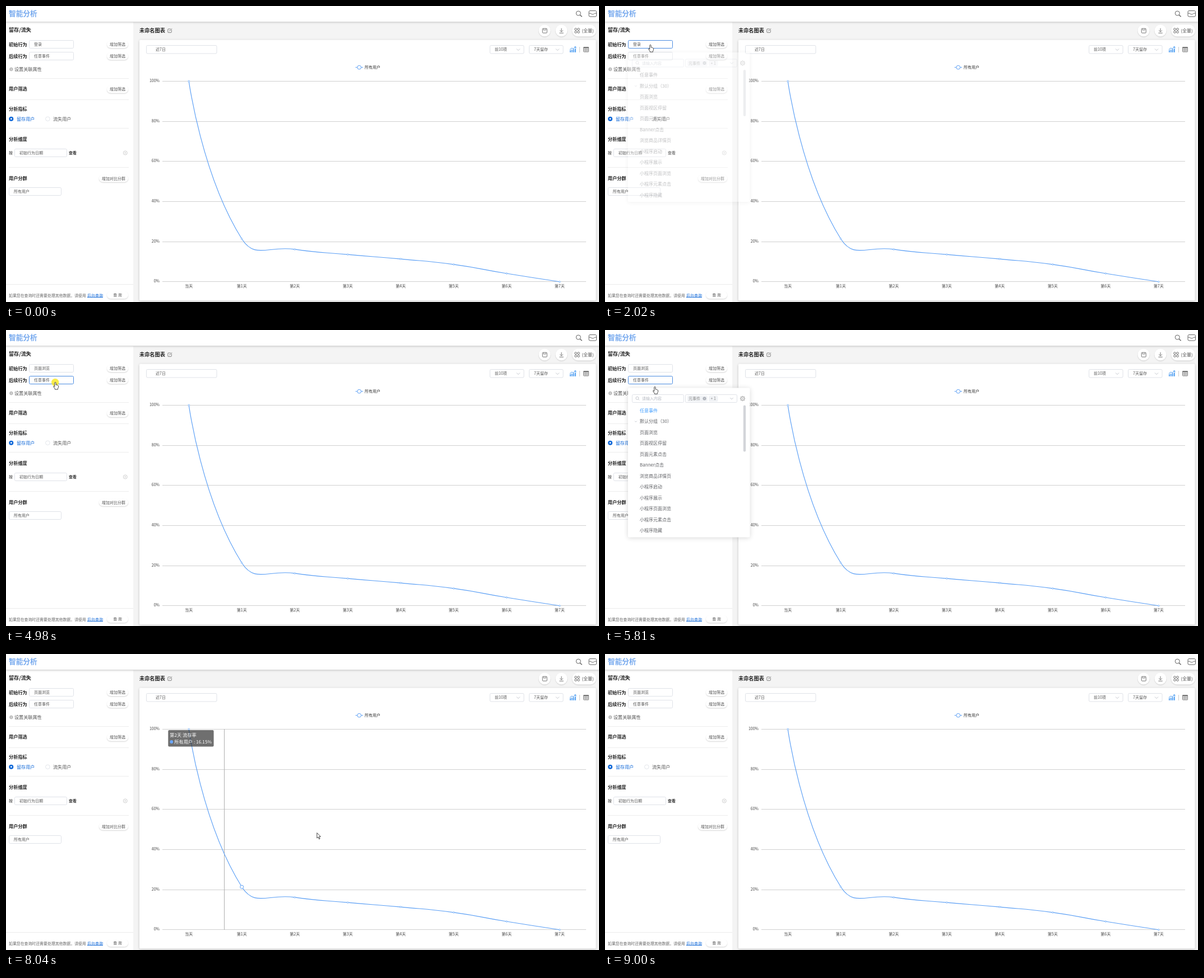
Recreate the animation shown at these times as an HTML page with a canvas. Size 1058 by 529 pixels, loop 9120 ms.

```html
<!DOCTYPE html>
<html lang="zh">
<head>
<meta charset="utf-8">
<title>智能分析</title>
<style>
html, body { margin: 0; width: 100%; height: 100%; overflow: hidden; background: #fff; }
canvas { display: block; width: 100vw; height: 100vh; }
</style>
</head>
<body>
<canvas id="stage" width="1058" height="529"></canvas>
<script>
const W = 1058, H = 529, LOOP = 9120;
const SANS = '"Noto Sans CJK SC", "Noto Sans CJK", "Noto Sans", sans-serif';
const BLUE = '#5b9ff5', ACCENT = '#1068d8', EDGE = '#dfe2e8', INK = '#555', ICON = '#666';
const main = document.getElementById('stage').getContext('2d');
const sheet = document.createElement('canvas');
sheet.width = W;
sheet.height = H;
const layer = sheet.getContext('2d');
let g = main;

const clamp = (v, a, b) => Math.min(b, Math.max(a, v));
const part = (t, a, b) => clamp((t - a) / (b - a), 0, 1);
const mix = (a, b, u) => a + (b - a) * u;
const easeOut = (u, p) => 1 - Math.pow(1 - u, p);
const smooth = u => u * u * (3 - 2 * u);

// ---- drawing helpers ----
function text(s, x, y, size = 7, color = INK, weight = 400, align = 'left') {
  g.font = `${weight} ${size}px ${SANS}`;
  g.fillStyle = color;
  g.textAlign = align;
  g.fillText(s, x, y + size * 0.37);
}
const bold = (s, x, y, size = 8.2) => text(s, x, y, size, '#222', 700);

function paint(fill, stroke, width = 1) {
  if (fill) { g.fillStyle = fill; g.fill(); }
  if (stroke) { g.strokeStyle = stroke; g.lineWidth = width; g.stroke(); }
}
function box(x, y, w, h, r, fill, stroke, width) {
  g.beginPath();
  g.roundRect(x, y, w, h, r);
  paint(fill, stroke, width);
}
function dot(x, y, r, fill, stroke, width) {
  g.beginPath();
  g.arc(x, y, r, 0, 7);
  paint(fill, stroke, width);
}
function line(color, width, ...p) {
  g.beginPath();
  for (let i = 0; i < p.length; i += 2) g.lineTo(p[i], p[i + 1]);
  paint(null, color, width);
}
function rect(x, y, w, h, color) {
  g.fillStyle = color;
  g.fillRect(x, y, w, h);
}
function raised(color, blur, dy, draw) {
  g.save();
  g.shadowColor = color;
  g.shadowBlur = blur;
  g.shadowOffsetY = dy;
  draw();
  g.restore();
}
function pill(x, y, w, h, label) {
  raised('rgba(0,0,0,.15)', 2, 1.2, () => box(x, y, w, h, h / 2, '#fff'));
  if (label) text(label, x + w / 2, y + h / 2, 7, INK, 400, 'center');
}
function field(x, y, w, h, label, indent = 9, focus = false) {
  box(x + .5, y + .5, w - 1, h - 1, 2, '#fff', focus ? '#4a8be0' : EDGE);
  text(label, x + indent, y + h / 2);
}
const chevron = (x, y, s = 3) => line('#b4b8c0', .8, x - s, y - s / 2, x, y + s / 2, x + s, y - s / 2);
function gear(x, y, r) {
  for (let i = 0; i < 8; i++) {
    const a = i * Math.PI / 4, c = Math.cos(a), s = Math.sin(a);
    line('#999', 1.2, x + c * r * .8, y + s * r * .8, x + c * r * 1.15, y + s * r * 1.15);
  }
  dot(x, y, r * .85, null, '#999', .8);
  dot(x, y, r * .35, null, '#999', .7);
}

// ---- pointer path ----
const stops = [
  // start, end, x, y, powers of the easing
  [470, 1310, 81, 69, 2.25, 1.73],
  [2430, 2880, 113.5, 162],
  [4250, 4630, 88, 93],
  [5710, 6120, 94.5, 146],
  [7690, 8600, 1002, 510, 1.45, 1.33],
  [8600, 9000, 1028, 531, 1.3, 1.3]
];
function pointer(t) {
  let x = 1058, y = 529;
  for (const [a, b, tx, ty, px, py] of stops) {
    if (t < a) break;
    const u = part(t, a, b);
    x = mix(x, tx, px ? easeOut(u, px) : smooth(u));
    y = mix(y, ty, py ? easeOut(u, py) : smooth(u));
  }
  return { x, y };
}
function drawPointer(t) {
  if (t < 470 || t >= 9000) return;
  const { x, y } = pointer(t);
  for (const start of [1580, 3620, 4820, 6380]) {
    const age = t - start;
    if (age >= 0 && age < 190) {
      g.globalAlpha = .8 * (1 - part(age, 170, 190));
      dot(x - .3, y + .5, 6.7, '#f7e81e');
      g.globalAlpha = 1;
    }
  }
  g.save();
  g.translate(x, y);
  g.lineJoin = 'round';
  g.beginPath();
  if (x < 122) {
    g.moveTo(-1.2, 8.4);
    g.lineTo(-1.2, 1.4);
    g.quadraticCurveTo(-1.1, .4, 0, .4);
    g.quadraticCurveTo(1, .4, 1.1, 1.4);
    g.lineTo(1.1, 5);
    g.quadraticCurveTo(2.3, 4.4, 2.9, 5.5);
    g.quadraticCurveTo(4.1, 5, 4.5, 6.2);
    g.quadraticCurveTo(5.7, 6, 5.7, 7.4);
    g.quadraticCurveTo(5.8, 10, 4.5, 11.4);
    g.lineTo(4.4, 13.2);
    g.lineTo(-.6, 13.2);
    g.lineTo(-.8, 11.8);
    g.lineTo(-3.3, 8.3);
    g.quadraticCurveTo(-3.4, 6.9, -2.2, 7.3);
  } else {
    g.moveTo(.5, 0);
    for (const [px, py] of [[.5, 9.4], [2.7, 7.5], [4.2, 11.2], [5.8, 10.5], [4.3, 7], [7, 6.7]]) g.lineTo(px, py);
  }
  g.closePath();
  paint('#fff', '#333', .9);
  g.restore();
}

// ---- chart ----
const LEFT = 279, STEP = 94.5, TOP = 134.3, FLOOR = 492.8;
const rates = [100, 21.34, 16.15, 13.57, 11.36, 8.63, 4.12, 0];
const points = rates.map((v, i) => [LEFT + STEP * (i + .5), mix(FLOOR, TOP, v / 100)]);
const days = rates.map((_, i) => i ? `第${i}天` : '当天');
const bandAt = x => clamp(Math.floor((x - LEFT) / STEP), 0, 7);

function curve() {
  const dist = (a, b) => Math.hypot(a[0] - b[0], a[1] - b[1]);
  let out = points[0];
  g.beginPath();
  g.moveTo(...out);
  for (let i = 1; i < points.length; i++) {
    const p = points[i], q = points[i + 1], o = points[i - 1];
    let into = p, next = p;
    if (q) {
      const vx = (q[0] - o[0]) / 2, vy = (q[1] - o[1]) / 2;
      const r = dist(p, q) / (dist(p, q) + dist(o, p));
      into = [p[0] - vx * (1 - r), p[1] - vy * (1 - r)];
      next = [p[0] + vx * r, p[1] + vy * r];
    }
    g.bezierCurveTo(...out, ...into, ...p);
    out = next;
  }
  paint(null, BLUE, 1.15);
}

function tooltip(x, band) {
  const rate = rates[band].toFixed(2) + '%';
  box(x, 136, 86 - 4.7 * (7 - rate.length), 29.5, 2, 'rgba(50,50,50,.7)');
  text(days[band] + ' 流存率', x + 3, 145, 8.2, '#fff');
  dot(x + 6, 157, 2.9, '#6aa5f8');
  text('所有用户 : ' + rate, x + 11, 157, 8.2, '#fff');
}

function chart(t) {
  for (let i = 0; i <= 5; i++) {
    const y = Math.round(133.9 + 71.7 * i);
    rect(LEFT, y, 756, 1, '#d0d0d0');
    text(100 - 20 * i + '%', 274, y - .2, 7, '#444', 400, 'right');
  }
  days.forEach((d, i) => text(d, points[i][0], 500, 7, '#444', 400, 'center'));
  line(BLUE, 1, 623.5, 109.7, 637, 109.7);
  dot(630.2, 109.7, 3.4, '#fff', BLUE);
  text('所有用户', 640, 109.2, 7, '#333');

  const tip = t > 520 && t < 990 ? 1 : t > 7825 && t < 8640 ? 2 : 0;
  const { x, y } = pointer(t);
  if (tip && x > LEFT && x < 1035 && y < FLOOR) {
    const lx = Math.round(clamp(pointer(t - 135).x, points[0][0], points[7][0]));
    rect(lx, 134, 1, 359, '#b0b0b0');
  }
  curve();
  const big = tip ? bandAt(pointer(t - 90).x) : -1;
  points.forEach(([px, py], i) => {
    if (i === big) dot(px, py, 3, '#fff', BLUE);
    else dot(px, py, 1.3, '#fff', BLUE, .7);
  });
  if (tip === 1) tooltip(mix(950, 360, Math.pow(part(t, 520, 965), 1.5)), bandAt(x));
  if (tip === 2) tooltip(280 + 430 * Math.pow(part(t, 7830, 8640), 2.85), bandAt(x));
}

// ---- page ----
function header() {
  raised('rgba(0,0,0,.22)', 4, 1, () => rect(0, 0, W, 28, '#fff'));
  text('智能分析', 5, 13.5, 12.7, '#76a9ee', 700);
  dot(1021.2, 13, 4, null, ICON, 1);
  line(ICON, 1.5, 1024.2, 16, 1027.6, 19.3);
  box(1040, 8.5, 13.5, 10.5, 2, null, ICON);
  g.beginPath();
  g.moveTo(1040, 13);
  g.lineTo(1043, 13);
  g.quadraticCurveTo(1046.7, 17, 1050.5, 13);
  g.lineTo(1053.5, 13);
  paint(null, ICON);
}

function panel(t) {
  rect(0, 29, 227, 500, '#fff');
  bold('留存/流失', 5, 43, 9.1);
  bold('初始行为', 5, 69);
  bold('后续行为', 5, 89.5);
  field(41, 61, 80, 15, t < 4040 ? '登录' : '页面浏览', 9, t >= 1580 && t < 3680);
  field(41, 82, 80, 15, '任意事件', 9, t >= 4820 && t < 6410);
  pill(180, 62, 38, 13, '增加筛选');
  pill(180, 83, 38, 13, '增加筛选');
  gear(9.3, 113, 2.8);
  text('设置关联属性', 15, 113, 8.1);
  bold('用户筛选', 5, 148);
  pill(180, 142, 38, 13.5, '增加筛选');
  bold('分析指标', 5, 183.5);
  dot(9.3, 201.7, 4, ACCENT);
  dot(9.3, 201.7, 1.4, '#fff');
  text('留存用户', 19, 202, 8.1, ACCENT);
  dot(74.4, 201.7, 3.8, '#fff', EDGE, .9);
  text('流失用户', 84, 202, 8.1);
  bold('分析维度', 5, 237.5);
  text('按', 5, 262.5, 7, '#333');
  field(15, 255, 94, 15, '初始行为日期');
  text('查看', 112, 262.5, 7, '#333', 700);
  dot(212.8, 262.5, 3.5, null, '#bbb', .7);
  line('#bbb', .7, 211.5, 261.2, 214.1, 263.8);
  line('#bbb', .7, 211.5, 263.8, 214.1, 261.2);
  bold('用户分群', 5, 307.5);
  pill(166, 301.5, 52, 13, '增加对比分群');
  field(5, 324, 94, 15, '所有用户');
  for (const y of [129, 167, 218, 288]) rect(5, y, 214, 1, '#ededed');
  rect(0, 497, 227, 1, '#ebebeb');
  text('如果您在查询时还需要处理其他数据，请使用', 5, 517.3, 6.9, '#666');
  text('后台查询', 145, 517.3, 7, ACCENT);
  rect(145, 520, 28, 1, ACCENT);
  pill(180, 510, 38, 13, '查 询');
}

function toolbar() {
  bold('未命名图表', 238, 44, 9.2);
  box(288.8, 41, 6.5, 6.5, 1, null, ICON, .8);
  line('#f4f4f4', 2.4, 291.5, 45, 296.3, 40);
  line('#777', 1, 291.3, 45.2, 296, 40.4);
  pill(950.5, 33.5, 21, 21);
  pill(980.5, 33.5, 21, 21);
  pill(1010, 33.5, 43, 21);
  box(957.2, 40.2, 8, 8, 1, null, ICON, .9);
  line(ICON, .8, 959.2, 40.5, 959.2, 43, 963.2, 43, 963.2, 40.5);
  line(ICON, .9, 991, 39.8, 991, 46);
  line(ICON, .9, 988.2, 43.5, 991, 46.3, 993.8, 43.5);
  line(ICON, .9, 987.3, 48.3, 994.7, 48.3);
  for (let i = 0; i < 4; i++) box(1014.8 + i % 2 * 5, 39.8 + (i >> 1) * 5, 3.4, 3.4, .8, null, ICON, .9);
  text('(全量)', 1027.3, 44, 8, INK);
}

function card(t) {
  raised('rgba(0,0,0,.2)', 4, 1, () => box(238, 60.5, 814.5, 466, 2, '#fff'));
  field(250, 70, 126.5, 15.5, '近7日', 17);
  field(863, 70, 61.5, 15.5, '前10项');
  field(933, 70, 61.5, 15.5, '7天留存');
  chevron(914, 78);
  chevron(984, 78);
  const blue = '#3d94f0';
  for (let i = 0; i < 4; i++) rect(1006 + i * 3, 79 - i * .9, 1.7, 3.8 + i * .9, blue);
  line(blue, 1, 1006, 78, 1009.5, 75.2, 1012, 76.5, 1016.5, 73);
  line(blue, 1, 1014, 73, 1016.7, 73, 1016.7, 75.6);
  rect(1023, 73, 1, 10, '#ccc');
  box(1030.5, 73.5, 9, 8.5, .5, null, '#777', .9);
  rect(1030.5, 73.5, 9, 2, '#777');
  for (const x of [1033.5, 1036.5]) line('#777', .7, x, 74, x, 82);
  for (const y of [77.5, 79.8]) line('#777', .7, 1030.5, y, 1039.5, y);
  chart(t);
}

// ---- event picker ----
const events = ['任意事件', '默认分组（30）', '页面浏览', '页面视区停留', '页面元素点击', 'Banner点击',
  '浏览商品详情页', '小程序启动', '小程序展示', '小程序页面浏览', '小程序元素点击', '小程序隐藏'];

function picker(t, dy, picked) {
  const { x, y } = pointer(t);
  g.translate(0, dy);
  raised('rgba(0,0,0,.16)', 8, 1, () => box(41, 83, 217.5, 267, 2, '#fff'));
  box(48.5, 95, 92, 14, 2, '#fff', EDGE);
  dot(57.5, 101.3, 2.5, null, '#b4b8c0', .8);
  line('#b4b8c0', .8, 59.4, 103.2, 61.3, 105);
  text('请输入内容', 66, 102, 7, '#b4b8c0');
  box(143.5, 95, 92, 14, 2, '#fff', EDGE);
  box(147, 97, 36, 10.5, 2, '#f0f2f5');
  text('元事件', 149, 102, 7, '#888');
  dot(177.5, 102, 3, '#a9adb5');
  line('#f0f2f5', .7, 176.3, 100.8, 178.7, 103.2);
  line('#f0f2f5', .7, 176.3, 103.2, 178.7, 100.8);
  box(185, 97, 16.5, 10.5, 2, '#f0f2f5');
  text('+ 1', 193.2, 102, 7, '#888', 400, 'center');
  chevron(226, 102, 2.7);
  gear(245.5, 102, 4);
  events.forEach((name, i) => {
    const cy = 123.4 + 19.5 * i, over = Math.abs(y - dy - cy) < 9.75 && x > 48;
    if (over && i !== 1) rect(48, cy - 9.75, 198, 19.5, '#f5f7fa');
    text(name, 62, cy, 8, i === picked ? '#409eff' : '#606266');
  });
  chevron(55, 143, 1.7);
  box(246.8, 114, 4.4, 83, 2.2, '#d3d5d9');
  g.setTransform(1, 0, 0, 1, 0, 0);
}

function popup(t, dy, picked, fadeIn, fadeOut) {
  const alpha = part(t, fadeIn, fadeIn + 210) * (1 - part(t, ...fadeOut));
  if (!alpha) return;
  layer.clearRect(0, 0, W, H);
  g = layer;
  picker(t, dy, picked);
  g = main;
  g.globalAlpha = alpha;
  g.drawImage(sheet, 0, 0);
  g.globalAlpha = 1;
}

function frame(now) {
  const t = now % LOOP;
  rect(0, 0, W, H, '#f4f4f4');
  panel(t);
  header();
  toolbar();
  card(t);
  popup(t, 0, -1, 1940, [4040, 4270]);
  popup(t, 20.5, 0, 5130, [6620, 6900]);
  drawPointer(t);
}

const begin = performance.now();
function tick() {
  frame(performance.now() - begin);
  requestAnimationFrame(tick);
}
tick();
</script>
</body>
</html>
```
